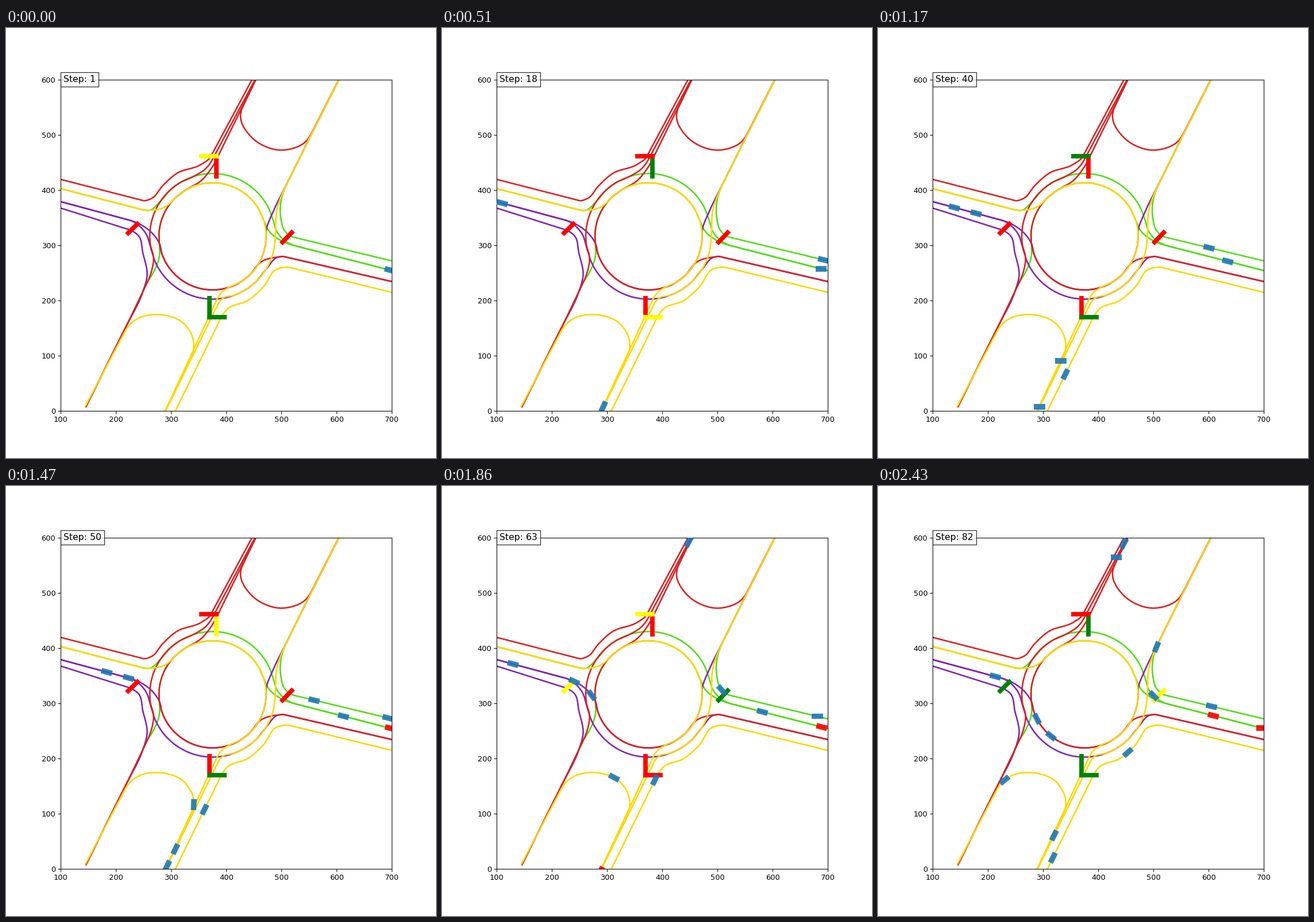
These frames come from a looping animation (748x748 px, 2460 ms). A matplotlib script:

```python
import numpy as np
import matplotlib.pyplot as plt
from matplotlib.animation import FuncAnimation
from matplotlib.patches import Rectangle

STEPS, INTERVAL = 82, 30
SIZE, DPI = 748, 93.5
SCALE = SIZE * 0.77 / 600
GREEN, PURPLE, RED, GOLD = "#58d820", "#7d28a8", "#d62224", "#ffd700"
CENTER, INNER, OUTER = (359.3, 362.4), 93.2, 109.2  # roundabout, stage pixels
LONG = 65   # segments longer than this stay straight
SPEED = 4.4  # pixels per step


def to_data(p):
    """Stage pixels (y down) to road map units (y up)."""
    p = np.asarray(p, float)
    return np.stack([100 + (p[..., 0] - 95.37) / SCALE,
                     (665.72 - p[..., 1]) / SCALE], axis=-1)


def arc(radius, start, end):
    """Points on the roundabout, anticlockwise from start to end degrees."""
    a = np.radians(np.linspace(start, end, round((end - start) / 14) + 1))
    return [(CENTER[0] + radius * np.cos(t), CENTER[1] - radius * np.sin(t)) for t in a]


def smooth(points):
    """Hermite curve through the points, sampled at every pixel of length."""
    p = np.array(points, float)
    seg = np.diff(p, axis=0)
    h = np.hypot(*seg.T)[:, None]
    d = seg / h
    tan = np.vstack([d[:1], (d[:-1] * h[1:] + d[1:] * h[:-1]) / (h[:-1] + h[1:]), d[-1:]])
    for k in np.flatnonzero(h[:, 0] > LONG):
        tan[k] = tan[k + 1] = d[k]
    t = np.linspace(0, 1, 12, endpoint=False)[:, None]
    parts = []
    for k in range(len(seg)):
        parts.append((2 * t**3 - 3 * t**2 + 1) * p[k] + (3 * t**2 - 2 * t**3) * p[k + 1]
                     + ((t**3 - 2 * t**2 + t) * tan[k] + (t**3 - t**2) * tan[k + 1]) * h[k])
    c = np.vstack(parts + [p[-1:]])
    s = np.r_[0, np.cumsum(np.hypot(*np.diff(c, axis=0).T))]
    u = np.arange(s[-1])
    return np.column_stack([np.interp(u, s, c[:, 0]), np.interp(u, s, c[:, 1])])


# Shared entries and exits
east_in = [(685, 425.5), (515, 382)]
west_in = [(80, 298), (214, 334)]
north_in = [(448, 62)]
south_in = [(264, 694)]
north_out = [(489, 270), (528, 191), (584, 80)]
east_out = [(474, 398.3), (485, 398), (690, 445.4)]
west_out = [(250, 317), (235, 315.5), (80, 275.5)]
south_out = [(245, 444), (210, 517), (139, 659)]

east_right = smooth([(685, 408.4), (500, 364), (485, 353), (478, 330), (478, 303)]
                    + north_out)
east_through = smooth(east_in + [(488, 372), (471, 354)] + arc(OUTER, 14, 146) + west_out)
east_left = smooth(east_in + [(475, 368), (458, 354)] + arc(INNER, 18, 187)
                   + [(267, 396), (256, 426)] + south_out)

west_right = smooth([(80, 308.5), (212, 350), (231, 362), (238, 391), (245.5, 430),
                     (238, 459), (210, 517), (139, 659)])
west_through = smooth(west_in + [(243, 357)] + arc(OUTER, 192, 327) + east_out)
west_left = smooth(west_in + [(258, 361), (267, 375)] + arc(INNER, 200, 352)
                   + [(453, 350), (465, 319)] + north_out)

north_right = smooth([(443, 61.7), (356, 224), (340, 237), (297, 253), (272, 275),
                      (254, 296), (238, 300), (80, 259.5)])
north_through = smooth(north_in + [(359, 229), (347, 245)] + arc(OUTER, 108, 200)
                       + [(254, 420)] + south_out)
north_left = smooth(north_in + [(368, 225), (356, 246), (339, 266)]
                    + arc(INNER, 120, 312) + [(445, 406)] + east_out)
north_turn = smooth(north_in + [(411, 139), (408, 154), (427, 190), (480, 212.5),
                                (521, 198), (536, 174), (584, 80)])

south_right = smooth([(281, 694), (372, 508), (386, 488), (420, 474.5), (448, 450),
                      (470, 420), (496, 417), (690, 464.5)])
south_through = smooth(south_in + [(369, 480), (379, 469)] + arc(OUTER, -70, 0)
                       + [(471, 318)] + north_out)
south_left = smooth(south_in + [(365, 476), (374, 461)] + arc(INNER, -72, 126)
                    + [(272, 313.5)] + west_out)
south_turn = smooth(south_in + [(324, 566), (326, 544), (308, 513), (268, 498.7),
                                (228, 506), (208, 526), (138, 658)])

roads = [(GREEN, [east_right, east_through, east_left]),
         (PURPLE, [west_right, west_through, west_left]),
         (RED, [north_right, north_through, north_left, north_turn]),
         (GOLD, [south_right, south_through, south_left, south_turn])]

fig, ax = plt.subplots(figsize=(SIZE / DPI, SIZE / DPI), dpi=DPI)
ax.set_xlim(100, 700)
ax.set_ylim(0, 600)
ax.set_aspect("equal")

for color, routes in roads:
    for route in routes:
        ax.plot(*to_data(route).T, color=color, lw=2)


class Signal:
    def __init__(self, start, end, phases):
        # phases: "step+colour" words, such as "1y 6r"
        self.phases = [(int(w[:-1]), w[-1]) for w in phases.split()]
        self.line, = ax.plot(*to_data([start, end]).T, lw=6, zorder=3,
                             solid_capstyle="projecting")

    def show(self, step):
        key = [c for at, c in self.phases if at <= step][-1]
        self.line.set_color({"r": "red", "y": "yellow", "g": "green"}[key])


north_post, south_post = (366.3, 223.3), (354, 503)
signals = [
    Signal(north_post, (366.3, 257.5), "1r 10g 24r 44y 55r 69y 77g"),
    Signal(north_post, (339.7, 223.3), "1y 6r 24g 44r 58y 77r"),
    Signal(south_post, (354, 470), "1g 10r 77g"),
    Signal(south_post, (380, 503), "1g 14y 24g 56r 69y 77g"),
    Signal((212.5, 356.6), (228.5, 340.9), "1r 27y 35r 58y 77g"),
    Signal((481, 372.6), (497, 355.9), "1r 57g 68r 77y"),
]


class Car:
    """Drives its route at constant speed except while held."""

    def __init__(self, route, start, holds=(), red=(0, 0), last=STEPS, speed=SPEED):
        self.route, self.start, self.holds = route, start, holds
        self.red, self.last, self.speed = red, last, speed
        self.body = Rectangle((0, 0), 20, 10, rotation_point="center",
                              alpha=0.9, lw=0, zorder=4)
        ax.add_patch(self.body)

    def along(self, step):
        held = sum(max(0, min(step, b) - a) for a, b in self.holds)
        return self.speed * (step - self.start - held)

    def place(self, s):
        idx = np.arange(len(self.route))
        return to_data([np.interp(s, idx, self.route[:, 0]),
                        np.interp(s, idx, self.route[:, 1])])

    def show(self, step):
        self.body.set_visible(self.start <= step <= self.last)
        s = self.along(step)
        x, y = self.place(s)
        dx, dy = self.place(s + 3) - self.place(s - 3)
        self.body.set_xy((x - 10, y - 5))
        # a standing car has no heading
        moving = s - self.along(step - 1) > 1e-6
        self.body.set_angle(np.degrees(np.arctan2(dy, dx)) if moving else 0)
        alert = self.red[0] <= step < self.red[1]
        self.body.set_facecolor("red" if alert else "tab:blue")


cars = [
    Car(east_through, -3, [(3, 28), (40, 45), (52, 58)]),
    Car(east_right, 12.6, speed=4.1),
    Car(east_right, 45.2, [(52.7, 65)]),
    Car(east_through, 46, [(51, 62)], red=(46, 83), speed=4.2),
    Car(east_through, 68.2, [(70.9, 75), (76.3, 99)], red=(76, 83)),
    Car(west_left, 12.2, [(19, 25.5)]),
    Car(west_left, 27.6),
    Car(west_left, 52.8),
    Car(south_turn, -3.4, [(4, 16.5), (38, 44)]),
    Car(south_right, 16.8),
    Car(south_through, 24.2, [(33, 43)], last=56),
    Car(south_through, 41.5, last=56),
    Car(south_through, 57.2, [(63.5, 66.5)], red=(57, 67)),
    Car(south_right, 70),
    Car(north_through, 53.9, [(64, 67.4), (73.3, 99)]),
    Car(north_through, 72.2),
]

label = ax.text(105, 600, "", fontsize=12, va="center", zorder=5,
                bbox=dict(facecolor="white", alpha=0.8))


def update(i):
    step = i + 1
    label.set_text(f"Step: {step}")
    for item in signals + cars:
        item.show(step)
    return []


anim = FuncAnimation(fig, update, frames=STEPS, interval=INTERVAL,
                     repeat=True, repeat_delay=0, blit=False)
plt.show()
```
